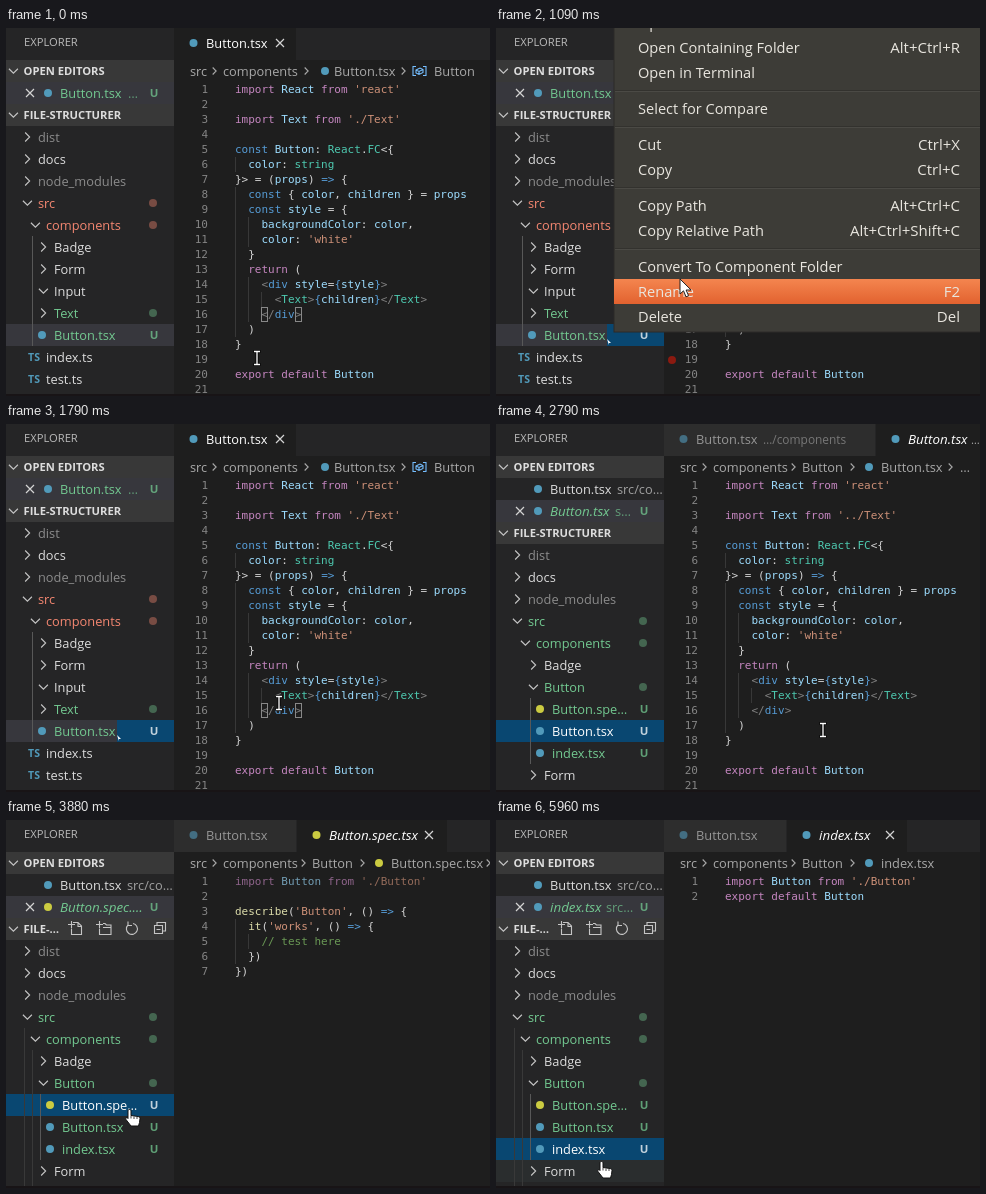
These frames come from a looping animation (484 by 368 pixels, 6.71 s). An HTML page:

```html
<!DOCTYPE html>
<html lang="en">
<head>
<meta charset="utf-8">
<title>Convert to component folder</title>
<style>
html, body { margin: 0; width: 100%; height: 100%; overflow: hidden; background: #1e1e1e; }
svg { display: block; }
text { font: 12.8px "Open Sans", "Noto Sans", sans-serif; white-space: pre; }
.small { font-size: 11.2px; }
.path { font-size: 11.9px; }
.head { font-size: 11.2px; font-weight: 700; }
.italic { font-style: italic; font-size: 13.4px; }
.badge { font-size: 11.4px; font-weight: 700; text-anchor: middle; opacity: .75; }
.ts { font-size: 10.5px; font-weight: 700; text-anchor: middle; }
.menu { font-size: 14.6px; }
.keys { font-size: 15px; text-anchor: end; }
.code { font: 11px "DejaVu Sans Mono", monospace; }
.num { text-anchor: end; }
</style>
</head>
<body>
<svg id="stage" width="484" height="368" viewBox="0 0 484 368"></svg>
<script>
const LOOP = 6710, STEP = 45;
const MENU_OPEN = 500, MENU_CLOSE = 1420, CONVERT = 1840, GIT = 2170, SPEC = 3880, INDEX = 5380;
const GREEN = '#73c991', RED = '#f48771', GREY = '#8c8c8c', LIGHT = '#dcdcdc', CRUMB = '#a9a9a9';
const BLUE = '#519aba', YELLOW = '#cbcb41', GUIDE = '#393939', ACTIVE_GUIDE = '#585858';
const INK = { P: '#c586c0', V: '#9cdcfe', S: '#ce9178', K: '#569cd6', T: '#4ec9b0',
  D: '#d4d4d4', F: '#dcdcaa', C: '#6a9955', G: '#808080' };

const rect = (x, y, w, h, fill, more = '') =>
  `<rect x="${x}" y="${y}" width="${w}" height="${h}" fill="${fill}" ${more}/>`;
const text = (x, y, s, fill, cls = '', more = '') =>
  `<text x="${x}" y="${y}" fill="${fill}" class="${cls}" ${more}>${s.replace(/</g, '&lt;')}</text>`;
const dot = (x, y, fill, more = '') => `<circle cx="${x}" cy="${y}" r="4" fill="${fill}" ${more}/>`;
const line = (d, stroke, w = 1.1) => `<path d="${d}" fill="none" stroke="${stroke}" stroke-width="${w}"/>`;
const right = (x, y, c = '#c5c5c5', r = 4.5) => line(`M${x - .6 - r / 2} ${y - r}l${r} ${r}l${-r} ${r}`, c);
const down = (x, y, c = '#c5c5c5', r = 4.5) => line(`M${x - .6 - r} ${y - r / 2}l${r} ${r}l${r} ${-r}`, c);
const cross = (x, y, c = '#d4d4d4') => line(`M${x - 4} ${y - 4}l8 8m0 -8l-8 8`, c, 1.2);
const during = (from, to, s) => `<g data-from="${from}" data-to="${to}">${s}</g>`;
const vline = (x, y1, y2, c) => rect(x, y1, 1, y2 - y1, c);

// Sidebar
const badge = (y, fill = GREEN) => text(148, y + 4, 'U', fill, 'badge');

function folder(y, level, name, fill = LIGHT, open = false, marked = false) {
  const x = 22 + level * 8;
  return (open ? down : right)(x, y) + text(x + 10, y + 5, name, fill) +
    (marked ? dot(147, y, fill, 'opacity=".4"') : '');
}

function file(y, level, name, fill, icon, selected) {
  const x = 28 + level * 8;
  return (selected ? rect(0, y - 11, 168, 22, '#094771') : '') +
    dot(x, y, icon) + text(x + 12, y + 5, name, selected ? '#fff' : fill) +
    badge(y, selected ? '#fff' : GREEN);
}

const tsFile = (y, name) => text(28, y + 4, 'TS', BLUE, 'ts') + text(40, y + 5, name, LIGHT);

const topFolders = y => folder(y, 0, 'dist', GREY) + folder(y + 22, 0, 'docs') +
  folder(y + 44, 0, 'node_modules', GREY);

const treeBefore = () => rect(0, 296, 168, 22, '#37373d') + vline(26, 208, 318, ACTIVE_GUIDE) +
  topFolders(109) + folder(175, 0, 'src', RED, true, true) +
  folder(197, 1, 'components', RED, true, true) +
  folder(219, 2, 'Badge') + folder(241, 2, 'Form') + folder(263, 2, 'Input', LIGHT, true) +
  folder(285, 2, 'Text', GREEN, false, true) +
  file(307, 1, 'Button.tsx', GREEN, BLUE) +
  tsFile(329, 'index.ts') + tsFile(351, 'test.ts');

function treeAfter(selected, status = GREEN) {
  return topFolders(131) + folder(197, 0, 'src', status, true, true) +
    folder(219, 1, 'components', status, true, true) + folder(241, 2, 'Badge') +
    folder(263, 2, 'Button', status, true, true) +
    file(285, 2, 'Button.spe…', GREEN, YELLOW, selected === 0) +
    file(307, 2, 'Button.tsx', GREEN, BLUE, selected === 1) +
    file(329, 2, 'index.tsx', status, BLUE, selected === 2) +
    folder(351, 2, 'Form') + vline(34, 274, 340, ACTIVE_GUIDE);
}

const openBefore = () => rect(0, 54, 168, 22, '#37373d') + cross(24, 65) + dot(42, 65, BLUE) +
  text(54, 70, 'Button.tsx', GREEN) + text(122, 70, '…', GREEN, '', 'opacity=".7"') + badge(65);

const openAfter = (name, path, pathX, icon) => dot(42, 65, BLUE) + text(54, 70, 'Button.tsx', LIGHT) +
  text(121, 70, 'src/co…', '#a0a0a0') + rect(0, 76, 168, 22, '#37373d') + cross(24, 87) +
  dot(42, 87, icon) + text(54, 92, name, GREEN, 'italic') +
  text(pathX, 92, path, GREEN, '', 'opacity=".7"') + badge(87);

const headerIcons = line('M67 102.500h5l3.500 3.500v8.500h-10v-6M72 102.500v4h3.500M62 104.500h7M65.500 101v7' +
  'M97 103.500h2l1.500 1.500h4.500v9.500h-11.500v-6M97 107.500h8M90 104.500h7M93.500 101v7' +
  'M122 105a5.500 5.500 0 1 0 5 -1.500M122 101.500v4h4' +
  'M148.500 105.500h8v8h-8zM151 105v-2.500h8.500v8.500h-2.500M150.500 109.500h4', '#c5c5c5');

// Editor
const codeText = (n, s) => `<text class="code" x="229" y="${50 + n * 15}">` +
  s.split('|').map(p => `<tspan fill="${INK[p[0]]}">${p.slice(1).replace(/</g, '&lt;')}</tspan>`).join('') + '</text>';

const code = lines => lines.map((s, i) =>
  text(202, 65 + i * 15, `${i + 1}`, '#858585', 'code num') + (s && codeText(i + 1, s))).join('');

const guide = (col, a, b) => vline(229 + col * 6.620 | 0, 39 + a * 15, 54 + b * 15, '#383838');

const buttonCode = path => guide(0, 6, 6) + guide(0, 8, 17) + guide(2, 10, 11) +
  guide(2, 14, 16) + guide(4, 15, 15) + code([
  "Pimport |VReact |Pfrom |S'react'", '',
  `Pimport |VText |Pfrom |S'${path}'`, '',
  'Kconst |VButton|D: |TReact|D.|TFC|D<{',
  'V  color|D: |Tstring',
  'D}> = (|Vprops|D) |K=>|D {',
  'K  const |D{ |Vcolor|D, |Vchildren|D } = |Vprops',
  'K  const |Vstyle|D = {',
  'V    backgroundColor|D: |Vcolor|D,',
  "V    color|D: |S'white'",
  'D  }',
  'P  return |D(',
  'G    <|Kdiv |Vstyle|D=|K{|Vstyle|K}|G>',
  'G      <|TText|G>|K{|Vchildren|K}|G</|TText|G>',
  'G    </|Kdiv|G>',
  'D  )',
  'D}', '',
  'Pexport default |VButton', ''
]);

const IMPORT_BUTTON = "Pimport |VButton |Pfrom |S'./Button'";
const specCode = () => guide(0, 4, 6) + guide(2, 5, 5) + code(['', '',
  "Fdescribe|D(|S'Button'|D, () |K=>|D {",
  "F  it|D(|S'works'|D, () |K=>|D {",
  'C    // test here', 'D  })', 'D})']) +
  `<g opacity=".67">${codeText(1, IMPORT_BUTTON)}</g>`;
const indexCode = () => code([IMPORT_BUTTON, 'Pexport default |VButton']);

function tab(x, w, name, icon, active, cls = '') {
  return rect(x, 0, w, 32, active ? '#1e1e1e' : '#2d2d2d') +
    dot(x + 19.500, 15, icon, active ? '' : 'opacity=".6"') +
    text(x + 32, 20, name, active ? '#fff' : '#969696', cls);
}

const crumbStart = text(184, 48, 'src', CRUMB) + right(209, 43, CRUMB, 3.500) + text(217, 48, 'components', CRUMB);
const crumbs = (name, icon) => crumbStart + right(298, 43, CRUMB, 3.500) + text(306, 48, 'Button', CRUMB) +
  right(357, 43, CRUMB, 3.500) + dot(373, 43, icon) + text(385, 48, name, CRUMB);

const brackets = [255, 289].map(x => rect(x + .5, 279.500, 6, 14, 'none', 'stroke="#888"')).join('');

const editors = during(0, CONVERT, tab(168, 122, 'Button.tsx', BLUE, true) + cross(274, 15) +
    crumbStart + right(301, 43, CRUMB, 3.500) + dot(319, 43, BLUE) + text(328, 48, 'Button.tsx', CRUMB) +
    right(398, 43, CRUMB, 3.500) + text(428, 48, 'Button', CRUMB) +
    line('M410 38.500h-3v9h3M417 38.500h3v9h-3M410 42l4 -2l3 1.500v3l-4 2l-3 -1.500zM410 42l3 1.500l4 -2M413 43.500v3', '#75beff') +
    buttonCode('./Text') + brackets) +
  during(CONVERT, SPEC, tab(168, 211, 'Button.tsx', BLUE) + text(267, 20, '…/components', '#777', 'path') +
    tab(380, 104, 'Button.tsx', BLUE, true, 'italic') + text(475, 20, '…', '#aaa', 'small') +
    crumbs('Button.tsx', BLUE) + right(455, 43, CRUMB, 3.500) + text(464, 48, '…', CRUMB) +
    buttonCode('../Text')) +
  during(SPEC, INDEX, tab(168, 122, 'Button.tsx', BLUE) +
    tab(291, 150, 'Button.spec.tsx', YELLOW, true, 'italic') + cross(423, 15) +
    crumbs('Button.spec.tsx', YELLOW) + right(483, 43, CRUMB, 3.500) + specCode()) +
  during(INDEX, LOOP, tab(168, 122, 'Button.tsx', BLUE) +
    tab(291, 120, 'index.tsx', BLUE, true, 'italic') + cross(394, 15) +
    crumbs('index.tsx', BLUE) + indexCode());

// Context menu
const ITEMS = [[-5, 'Open to the Side', ''], [20, 'Open Containing Folder', 'Alt+Ctrl+R'], [45, 'Open in Terminal', ''],
  [81, 'Select for Compare', ''], [117, 'Cut', 'Ctrl+X'], [142, 'Copy', 'Ctrl+C'],
  [178, 'Copy Path', 'Alt+Ctrl+C'], [203, 'Copy Relative Path', 'Alt+Ctrl+Shift+C'],
  [239, 'Convert To Component Folder', ''], [264, 'Rename', 'F2'], [289, 'Delete', 'Del']];
const menu = rect(118, -1, 367, 305, '#3d3c37', 'stroke="#2c2b28"') +
  [63, 99, 160, 221].map(y => rect(119, y - 1, 365, 1, '#33322e') + rect(119, y, 365, 1, '#4b4a45')).join('') +
  rect(118, 251, 366, 25, 'url(#hot)', 'id="hot-item"') +
  ITEMS.map(([y, name, keys]) => text(142, y + 5, name, '#e9e6df', 'menu') +
    text(464, y + 5, keys, '#e9e6df', 'menu keys')).join('');

const stage = document.getElementById('stage');
stage.innerHTML = `<defs><linearGradient id="hot" x2="0" y2="1">
    <stop stop-color="#f4854f"/><stop offset="1" stop-color="#e2622f"/></linearGradient></defs>` +
  rect(0, 0, 484, 368, '#1e1e1e') + rect(168, 0, 316, 32, '#252526') + editors +
  `<g id="folds">${[1, 5, 7, 9, 13, 14].map(n => down(216, 47 + n * 15, '#c5c5c5', 3.500)).join('')}</g>` +
  dot(176, 0, '#8b1a10', 'id="hint"') +
  rect(0, 0, 168, 368, '#252526') + text(18, 18, 'EXPLORER', '#bbb', 'small') +
  rect(0, 32, 168, 22, '#383838') + down(8, 43) + text(17.500, 47, 'OPEN EDITORS', '#ddd', 'head') +
  rect(0, 0, 168, 22, '#2a2d2e', 'id="hover"') +
  during(0, CONVERT, openBefore() + treeBefore()) +
  during(MENU_OPEN, CONVERT, rect(111, 296, 57, 22, '#094771') + badge(307, '#fff')) +
  during(540, CONVERT, '<path d="M111 311l4 4h-2v2z" fill="#fff"/>') +
  during(CONVERT, SPEC, openAfter('Button.tsx', 's…', 119, BLUE)) +
  during(CONVERT, GIT, treeAfter(1, RED)) + during(GIT, SPEC, treeAfter(1)) +
  during(SPEC, INDEX, openAfter('Button.spec.…', '', 137, YELLOW) + treeAfter(0)) +
  during(INDEX, LOOP, openAfter('index.tsx', 'src…', 110, BLUE) + treeAfter(2)) +
  `<g id="guides">${vline(18, 208, 366, GUIDE) + vline(26, 230, 366, GUIDE)}</g>` +
  `<g id="project">${rect(0, 98, 168, 22, '#383838') + down(8, 109)}
    <g id="title">${text(17.500, 113, 'FILE-STRUCTURER', '#ddd', 'head')}</g>
    <g id="tools">${text(17.500, 113, 'FILE-…', '#ddd', 'head') + headerIcons}</g></g>` +
  rect(0, 366, 484, 2, '#181416') +
  during(MENU_OPEN, MENU_CLOSE, menu) +
  `<g id="pointer" stroke-linejoin="round">
    <g id="hand" stroke="#111"><path fill="#fff" d="M.5 .5c1 0 1.500.7 1.500 1.500v4.500l7 1c1.300.3 2 1 2 2l-.5 4-1 3.500H2L-3 10.500c-.8-1 .3-2.200 1.400-1.600l.6.6V2C-1 1-.5.5.5.5Z"/>
    <path fill="none" stroke-width=".8" d="M2 6.500v3M5 7.500v2.500M8 8v2"/></g>
    <path id="arrow" fill="#fff" stroke="#222" d="M0 0v15l3.500-3.200 2.500 6 2.600-1.100-2.500-5.700h5Z"/>
    <g id="beam" fill="none"><path stroke="#000" stroke-width="3" d="M-3.500 -6.500h7M0 -6.500v13M-3.500 6.500h7"/>
    <path stroke="#fff" stroke-width="1.300" d="M-3 -6.500h6M0 -6.500v13M-3 6.500h6"/></g></g>`;

// Pointer path: time, x, y of the hot spot
const PATH = [[0, 251, 330], [40, 251, 330], [230, 190, 333], [455, 114, 303], [540, 114, 303], [590, 121, 302],
  [750, 121, 302], [1090, 184, 251], [1130, 187, 247], [1380, 187, 247], [1420, 193, 240], [1460, 193, 240],
  [1640, 240, 262], [2000, 327, 306], [2910, 327, 306], [3120, 215, 316], [3280, 150, 315], [3460, 121, 290],
  [3540, 122, 290], [3630, 123, 289], [4840, 123, 289], [5000, 41, 337], [5790, 41, 337], [5840, 80, 340],
  [5915, 80, 340], [5960, 105, 341], [LOOP, 105, 341]];

function pointerAt(t) {
  const i = PATH.findIndex(p => p[0] > t);
  const [t0, x0, y0] = PATH[i - 1], [t1, x1, y1] = PATH[i];
  const k = Math.floor((t - t0) / STEP) * STEP / (t1 - t0);
  return [Math.round(x0 + (x1 - x0) * k), Math.round(y0 + (y1 - y0) * k)];
}

const $ = id => document.getElementById(id);
const show = (el, on) => el.setAttribute('visibility', on ? 'inherit' : 'hidden');
const clamp = v => Math.max(0, Math.min(1, v));
const layers = [...document.querySelectorAll('[data-from]')];
const start = performance.now();

function draw() {
  const t = (performance.now() - start) % LOOP;
  for (const el of layers) show(el, t >= +el.dataset.from && t < +el.dataset.to);

  const [x, y] = pointerAt(t);
  const menuOpen = t >= MENU_OPEN && t < MENU_CLOSE;
  const arrow = menuOpen && t >= 540, hand = !arrow && x < 206;
  const inSide = x < 168 && !menuOpen, inGutter = hand && x >= 168;
  $('pointer').setAttribute('transform', `translate(${x} ${y})`);
  show($('arrow'), arrow);
  show($('hand'), hand);
  show($('beam'), !arrow && !hand);

  show($('hint'), inGutter || menuOpen);
  $('hint').setAttribute('cy', menuOpen ? 332 : 62 + Math.floor((y - 54) / 15) * 15);
  show($('hover'), inSide);
  $('hover').setAttribute('y', Math.floor((y - 10) / 22) * 22 + 10);
  const row = ITEMS.find(([c]) => y >= c - 13 && y < c + 12);
  show($('hot-item'), arrow && row);
  if (row) $('hot-item').setAttribute('y', row[0] - 13);

  $('project').setAttribute('transform', `translate(0 ${t < CONVERT ? -22 : 0})`);
  show($('title'), !inSide);
  show($('tools'), inSide);
  show($('guides'), inSide && t >= CONVERT);
  $('folds').setAttribute('opacity', Math.min(clamp((t - 3100) / 200), clamp((3630 - t) / 180)) * .8);
  requestAnimationFrame(draw);
}
draw();
</script>
</body>
</html>
```
